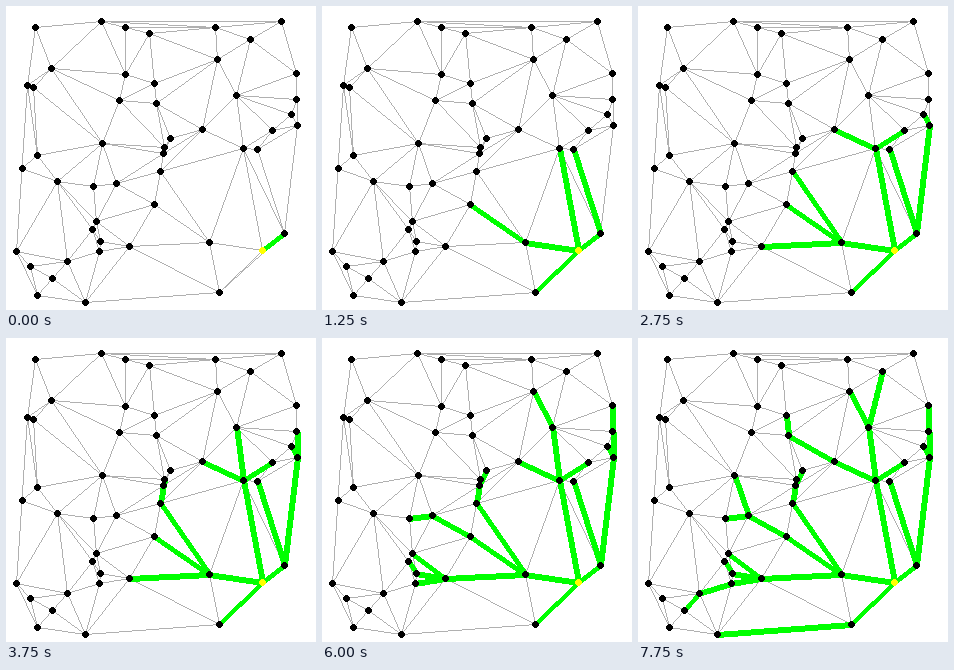
Recreate the animation shown at these times as a matplotlib script. Size 310 by 304 pixels, loop 8000 ms.

```python
import matplotlib.pyplot as plt
import numpy as np
from matplotlib.animation import FuncAnimation
from matplotlib.tri import Triangulation

W, H, DPI = 310, 304, 100
STEPS, STEP_MS = 32, 250
X_SCALE = 1.05         # the picture is slightly narrower than the real map
WHITE, BLACK, GREY = (255,) * 3, (0,) * 3, (176,) * 3
GREEN, YELLOW = (0, 255, 0), (255, 255, 0)
THIN, THICK = range(1), range(-2, 4)     # pixel offsets across a line


def make_nodes():
    """Place the towns; the first one is the start."""
    junctions = [
        (256, 244), (278, 227), (203, 236), (213, 286), (79, 296),
        (123, 240), (94, 235), (93, 245), (90, 215), (24, 260),
        (148, 198), (110, 177), (51, 175), (31, 149), (27, 81),
        (154, 165), (157, 147), (158, 141), (164, 132), (150, 97),
        (237, 142), (251, 143), (266, 124), (285, 108), (196, 123),
        (230, 89), (211, 53), (244, 33), (148, 77), (119, 68), (45, 62),
    ]
    s = np.arange(-2, 4)
    wave = np.sin(np.pi * s / 2)
    top = np.column_stack([119 + 45 * s - 21 * wave, 21 + 6 * wave])
    t = np.arange(4)
    bow = np.column_stack([113 - 21 * t + 4 * t**2, 94 + 43 * t])
    left = np.linspace((21, 79), (10, 245), 3)
    right = np.linspace((290, 67), (291, 119), 3)
    corner = np.linspace((61, 255), (31, 289), 3)
    return np.vstack([junctions, top, bow, left, right, corner])


def shortest_tree(places, links, count):
    """Return the first links of Dijkstra's tree from node 0, in order."""
    both_ways = links + [(b, a) for a, b in links]
    dist, tree = {0: 0.0}, []
    while len(tree) < count:
        d, a, b = min((dist[a] + np.hypot(*(places[a] - places[b])), a, b)
                      for a, b in both_ways if a in dist and b not in dist)
        dist[b] = d
        tree.append((a, b))
    return tree


def draw_line(img, a, b, color, offsets):
    """Draw a hard-edged line, widened along the axis it crosses."""
    dx, dy = np.abs(b - a)
    count = int(np.rint(max(dx, dy))) + 1
    x, y = np.rint(np.linspace(a, b, count)).astype(int).T
    for o in offsets:
        if dy > dx:
            img[y, x + o] = color
        else:
            img[y + o, x] = color


def draw_dot(img, center, color):
    x, y = np.rint(center).astype(int)
    dy, dx = np.mgrid[-3:4, -3:4]
    img[y - 3:y + 4, x - 3:x + 4][dx**2 + dy**2 <= 10] = color


nodes = make_nodes()
real = nodes * (X_SCALE, 1)
links = [tuple(map(int, e)) for e in Triangulation(*real.T).edges]
route = shortest_tree(real, links, STEPS)

mesh = np.full((H, W, 3), WHITE, dtype=np.uint8)
for a, b in links:
    draw_line(mesh, nodes[a], nodes[b], GREY, THIN)


def render(step):
    img = mesh.copy()
    for a, b in route[:step + 1]:
        draw_line(img, nodes[a], nodes[b], GREEN, THICK)
    for node in nodes[1:]:
        draw_dot(img, node, BLACK)
    draw_dot(img, nodes[0], YELLOW)
    return img


fig = plt.figure(figsize=(W / DPI, H / DPI), dpi=DPI, facecolor="white")
ax = fig.add_axes([0, 0, 1, 1])
ax.axis("off")
picture = ax.imshow(render(0), extent=(0, W, H, 0), aspect="auto",
                    interpolation="nearest")


def draw(step):
    picture.set_data(render(step))
    return [picture]


anim = FuncAnimation(fig, draw, frames=STEPS, interval=STEP_MS,
                     repeat=True, repeat_delay=0)
plt.show()
```
